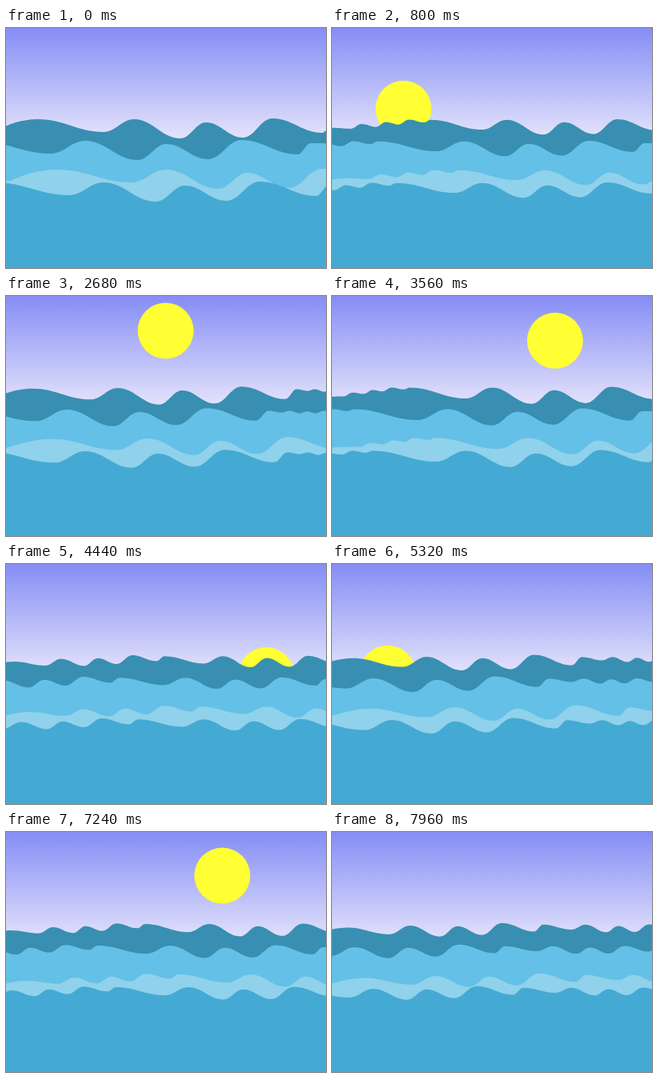
Animation of 400x300 px, one loop 8 s. Source, as an HTML page:

```html
<!DOCTYPE html>
<html lang="en">
<head>
<meta charset="utf-8">
<title>Sun over the sea</title>
<style>
  html, body { margin: 0; width: 100%; height: 100%; overflow: hidden; }
  svg { display: block; width: 100%; height: 100%; }
</style>
</head>
<body>
<svg viewBox="0 0 400 300" preserveAspectRatio="none">
  <defs>
    <linearGradient id="sky" gradientUnits="userSpaceOnUse" x1="0" y1="0" x2="0" y2="132">
      <stop offset="0" stop-color="#858df5"/>
      <stop offset="1" stop-color="#e0e0fb"/>
    </linearGradient>
  </defs>
  <rect width="400" height="300" fill="url(#sky)"/>
  <circle id="sun" r="35" fill="#ffff33"/>
  <g id="sea"></g>
</svg>
<script>
const LOOP = 8000, SWELL = 3000, STEP = 40;

// One full swell, crest and trough in turn; every layer shares it.
const swell = [
  [40, 114], [122, 130], [160, 114], [218, 138],
  [250, 118], [296, 137], [333, 113], [395, 131]
];
const N = swell.length;
const START = swell[0][0], END = 410;

const layers = [
  { color: '#388fb1', scale: 1, dx: 0, dy: 0 },
  { color: '#64c0e6', scale: 1.13, dx: -82, dy: 27 },
  { color: '#90d1eb', scale: 1.13, dx: 19, dy: 63 },
  { color: '#44aad3', scale: 1.13, dx: -59, dy: 79 }
];

// The sun spends the same time on each leg of its arc.
const arc = [[64, 147], [104, 74], [178, 40], [286, 57], [345, 180]];
const crossings = [{ from: 40, span: 4800 }, { from: 5220, span: 2830 }];

const sun = document.getElementById('sun');
const sea = document.getElementById('sea');
for (const layer of layers) {
  layer.path = document.createElementNS('http://www.w3.org/2000/svg', 'path');
  layer.path.setAttribute('fill', layer.color);
  sea.append(layer.path);
}

const mix = (a, b, k) => a + (b - a) * k;
const mixPoint = (a, b, k) => [mix(a[0], b[0], k), mix(a[1], b[1], k)];

// A swell grows out of a short slope on the left and shrinks to ripples on the right.
const newborn = i => [START - 52 * (1 - i / N), 114 + 14 * (1 - i / N) ** 2];
const spent = i => [END + 36 * i / N, 117];

function wavePoints(k) {
  return [
    [START - 82, 130],
    ...swell.map((point, i) => mixPoint(newborn(i), point, k)),
    ...swell.map((point, i) => mixPoint(point, spent(i), k)),
    mixPoint(spent(0), spent(N), k),
    [END + 100, 120]
  ];
}

function waveShape(points, { scale, dx, dy }) {
  const at = (x, y) => `${(x * scale + dx).toFixed(2)} ${(y + dy).toFixed(2)}`;
  let [px, py] = points[0];
  let d = `M${at(px, 310)}L${at(px, py)}`;
  for (const [x, y] of points.slice(1)) {
    const h = (x - px) * 0.4;
    d += `C${at(px + h, py)} ${at(x - h, y)} ${at(x, y)}`;
    [px, py] = [x, y];
  }
  return d + `L${at(px, 310)}Z`;
}

function drawSun(t) {
  const run = crossings.find(c => t >= c.from && t < c.from + c.span);
  sun.style.display = run ? '' : 'none';
  if (!run) return;
  const pos = (t - run.from) / run.span * (arc.length - 1);
  const leg = Math.floor(pos);
  const [x, y] = mixPoint(arc[leg], arc[leg + 1], pos - leg);
  sun.setAttribute('cx', x.toFixed(2));
  sun.setAttribute('cy', y.toFixed(2));
}

function drawSea(t) {
  const p = (t % SWELL) / SWELL;
  const points = wavePoints(p * (0.79 + 0.21 * p));
  for (const layer of layers) layer.path.setAttribute('d', waveShape(points, layer));
}

const start = performance.now();
function tick() {
  const now = (performance.now() - start) % LOOP;
  const t = Math.floor(now / STEP) * STEP;
  drawSun(t);
  drawSea(t);
  requestAnimationFrame(tick);
}
tick();
</script>
</body>
</html>
```
